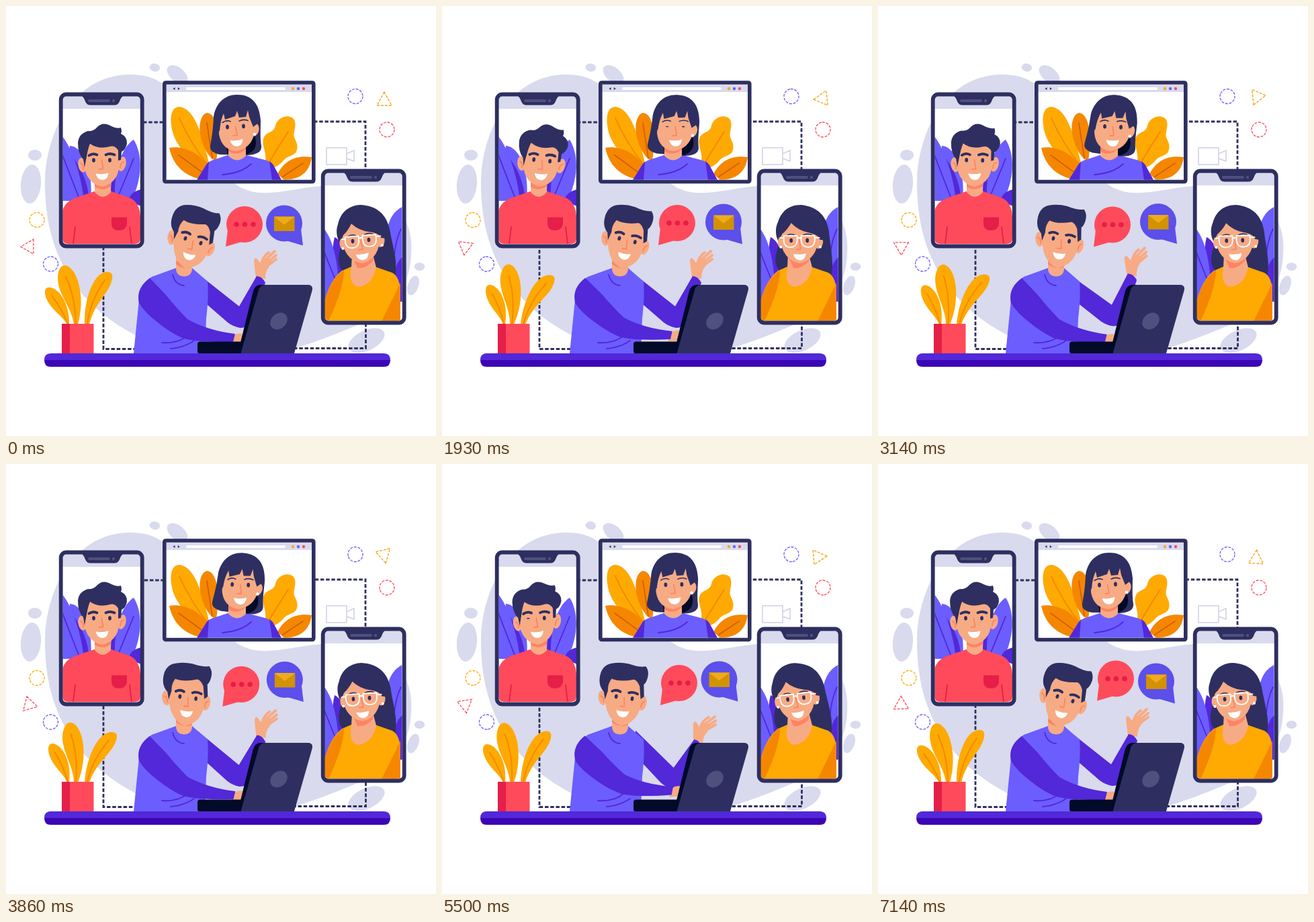
An HTML page for the animation above (7210 ms loop, 640 by 640 pixels).

```html
<!DOCTYPE html>
<html lang="en">
<head>
<meta charset="utf-8">
<title>Video call</title>
<style>
html, body { margin: 0; width: 100%; height: 100%; overflow: hidden; background: #fff; }
svg { display: block; width: 100vw; height: 100vh; }
.n { fill: #2e2f60 } .k { fill: #020a28 } .w { fill: #fff } .b { fill: #d9daed }
.p { fill: #6c5dff } .d { fill: #5228d9 } .r { fill: #ff4a5b } .m { fill: #e51f48 }
.o { fill: #ffa903 } .a { fill: #f58700 } .s { fill: #f7ab84 } .h { fill: #ff8364 }
.l { fill: none; stroke-width: 1.8; stroke-linecap: round; stroke-linejoin: round }
.ln { stroke: #2e2f60 } .ld { stroke: #5228d9 } .la { stroke: #f58700 }
.lm { stroke: #e51f48 } .lh { stroke: #ff8364 } .lw { stroke: #fff } .lc { stroke: #d35f08 }
.dash { fill: none; stroke-width: 1.3; stroke-dasharray: 4 1.8 }
</style>
</head>
<body>
<svg viewBox="0 0 640 640">
<defs>
  <clipPath id="screenL"><path d="M84.5 153H200V346Q200 354 192 354H92Q84.5 354 84.5 346Z"/></clipPath>
  <clipPath id="screenR"><path d="M474 267H589.5V460Q589.5 468.5 582 468.5H482Q474 468.5 474 460Z"/></clipPath>
  <clipPath id="screenM"><path d="M238 128H455V258.5H238Z"/></clipPath>
  <g id="phone">
    <rect class="w" x="81.5" y="131.5" width="121" height="226" rx="8"/>
    <path class="b" d="M84 153V140Q84 134 92 134H192Q200 134 200 140V153Z"/>
  </g>
  <g id="bezel">
    <rect class="ln" fill="none" x="81.7" y="131.5" width="121" height="226" rx="8" stroke-width="5.8"/>
    <path class="n" d="M112 133H175Q171 136 169 142Q167 147.500 161 147.500H126Q120 147.500 118 142Q116 136 112 133Z"/>
    <rect x="122" y="139" width="33" height="4" rx="2" fill="#50507f"/>
    <circle cx="160" cy="141" r="2.2" fill="#50507f"/>
  </g>
</defs>

<!-- backdrop -->
<g class="b">
  <path d="M185 102C100 102 58 190 58 265C58 390 125 458 205 496V517H400C440 509 488 490 520 476C590 450 606 400 603 350C600 310 570 262 470 268C430 271 395 283 365 276C335 268 320 245 300 220C260 150 250 102 185 102Z"/>
  <ellipse cx="221.5" cy="91.5" rx="7.8" ry="6" transform="rotate(10 221 91)"/>
  <ellipse cx="255" cy="102" rx="18" ry="10.5" transform="rotate(40 255 102)"/>
  <ellipse cx="43" cy="222" rx="10" ry="8"/>
  <ellipse cx="37" cy="265" rx="15" ry="29" transform="rotate(5 37 265)"/>
  <ellipse cx="615.5" cy="388" rx="7.8" ry="6"/>
  <ellipse cx="606" cy="416" rx="8" ry="15" transform="rotate(20 606 416)"/>
  <ellipse cx="536.5" cy="498" rx="29" ry="15" transform="rotate(-25 536 498)"/>
</g>
<g id="links" class="ln" fill="none" stroke-width="2.8" stroke-dasharray="5.5 2.7">
  <path d="M204 173H236"/><path d="M458 172H535V246"/>
  <path d="M145 358V510.5H194"/><path d="M535.5 472V509.5H428"/>
</g>
<g class="dash">
  <circle class="spin" cx="520" cy="134.5" r="11" stroke="#6c5dff"/>
  <circle class="spin" cx="567" cy="184" r="11" stroke="#ff4a5b"/>
  <circle class="spin" cx="46" cy="318.5" r="11" stroke="#ffa903"/>
  <circle class="spin" cx="66.5" cy="384" r="11" stroke="#6c5dff"/>
  <path id="triO" d="M563 128L574 148H552Z" stroke="#f5a20a"/>
  <path id="triR" d="M34.5 345.5L45.5 364.5H23.5Z" stroke="#ff4a5b"/>
</g>
<path fill="none" stroke="#d0d0e3" stroke-width="1.5" d="M477 211H507V236H477ZM507 220L518 215V231L507 227"/>

<!-- left phone -->
<use href="#phone"/>
<g clip-path="url(#screenL)">
  <path class="p" d="M95 208C116 210 130 245 126 290H108C94 265 90 235 95 208Z"/>
  <path class="d" d="M97 222C112 240 122 262 124 290H100Z"/>
  <path class="p" d="M84 194C98 212 112 250 116 290H84Z"/>
  <path class="d" d="M172 222C158 238 154 262 157 290H170Z"/>
  <path class="p" d="M190 199C170 212 160 250 162 290H186C203 260 204 220 190 199Z"/>
  <path class="l ld" d="M84 222L108 284M190 227L167 283"/>
  <path class="d" d="M201 273Q183 277 183 291L201 298Z"/>
  <path class="r" d="M84 355V306Q87 290 108 284L131 276H157L183 285Q199 291 200 314V355Z"/>
  <path class="m" d="M157 314.5H180V325Q178 334 168 334Q158 334 157 325Z"/>
  <path class="l lm" d="M103 329L100 354M184 329L187 354"/>
  <path class="s" d="M132 255H156V277Q144 291 132 277Z"/>
  <path class="h" d="M132 260H156V268Q144 277 132 269Z"/>
  <g id="headL">
    <ellipse class="s" cx="113.5" cy="237" rx="6" ry="11" transform="rotate(-10 113 237)"/>
    <ellipse class="s" cx="172.5" cy="235" rx="6" ry="11" transform="rotate(12 172 235)"/>
    <path class="l lh" d="M111 234Q116 236 115 243M175 232Q170 234 170 241"/>
    <path class="s" d="M117 200V241Q121 264 143 269Q165 264 168 241V200Z"/>
    <path class="n" d="M117 240L115 228Q107 220 107 204Q108 190 122 186Q130 187 135 181Q144 171 157 179Q165 183 171 181Q173 187 171 190Q181 195 180 205Q178 214 172 217L171 229L167 230V215Q162 207 155 209Q138 214 125 205Q122 212 120 224Z"/>
    <g id="faceL"></g>
  </g>
</g>
<use href="#bezel"/>

<!-- browser window -->
<rect class="w" x="236" y="114" width="222" height="147"/>
<path class="b" d="M238 117H455V128H238Z"/>
<rect class="w" x="268" y="121" width="148" height="4" rx="2"/>
<path class="n" d="M251.5 121V125L248.5 123ZM255.800 121V125L258.8 123Z"/>
<circle class="o" cx="427" cy="123" r="2.2"/><circle class="p" cx="435" cy="123" r="2.2"/><circle class="r" cx="443" cy="123" r="2.2"/>
<g clip-path="url(#screenM)">
  <path class="o" d="M303 238C280 238 255 212 248 188C242 164 247 150 258 150C280 152 292 190 303 238Z"/>
  <path class="a" d="M307 228C286 207 282 164 299 159C316 160 318 200 313 230Z"/>
  <path class="a" d="M243 211C268 207 292 222 302 240L292 258C265 254 248 236 243 211Z"/>
  <path class="l la" d="M258 167Q275 205 300 236"/>
  <path class="l lc" d="M299 174L307 226M257 222L294 249"/>
  <path class="o" d="M385 235C390 220 380 208 383 198C386 186 399 190 401 178C404 166 420 160 428 168C434 176 427 188 429 195C431 201 435 206 433 214C431 224 419 222 413 230C406 238 395 244 388 243Z"/>
  <path class="a" d="M455 225C430 221 413 232 404 250L414 259C440 258 452 246 455 225Z"/>
  <path class="l la" d="M420 187Q405 210 392 232"/>
  <path class="l lc" d="M442 234L412 254"/>
  <path class="p" d="M284 259L297 238Q300 231 312 228L330 222H358L385 229Q396 232 399 239L410 259Z"/>
  <path class="d" d="M284 259L297 238Q300 233 302 232L300 259ZM392 231Q397 234 399 239L410 259H396Z"/>
  <path class="l ld" d="M322 251Q350 249 365 235"/>
  <path id="hairM" class="n" d="M344 132C325 132 312 145 309 165C308 190 305 200 304 210Q304 218 318 221L360 222C375 221 381 216 380 208C378 195 379 185 379 170C377 145 366 132 344 132Z"/>
  <path id="innerM" class="k" d="M325 195H371Q376 215 358 221H330Z"/>
  <path class="s" d="M331 200H357V223Q344 236 331 223Z"/>
  <path class="h" d="M331 208H357V213Q344 225 331 216Z"/>
  <g id="headM">
    <ellipse class="s" cx="371" cy="184" rx="5.5" ry="9" transform="rotate(10 371 184)"/>
    <path class="s" d="M317 155V191Q321 214 343 216Q366 211 370 188V155Z"/>
    <path class="n" d="M315 186Q310 150 330 142H358Q376 150 373 176L368 180L362 165L360 155L357 165L347 166L344 156L341 164L326 169L324 160Q319 170 318 186Z"/>
    <circle class="w" cx="370" cy="191" r="2.3"/>
    <g id="faceM"></g>
  </g>
</g>
<rect class="ln" fill="none" x="235.8" y="114" width="222" height="147.5" rx="2" stroke-width="5.6"/>

<!-- right phone -->
<use href="#phone" x="390" y="114"/>
<g clip-path="url(#screenR)">
  <path class="d" d="M489 344C506 352 512 385 506 420H492C485 395 484 365 489 344Z"/>
  <path class="p" d="M473 331C486 347 496 380 496 440H473Z"/>
  <path class="p" d="M590 299C566 310 561 345 570 385L578 440H590Z"/>
  <path class="d" d="M590 374C577 384 574 410 580 440H590Z"/>
  <path class="l ld" d="M474 367L492 412M588 332Q578 352 577 385"/>
  <path id="hairR" class="n" d="M527 296C552 297 566 310 571 332C574 350 578 362 580 380Q581 397 578 408L502 396C492 386 494 372 499 356C491 345 491 333 494 325C498 305 512 297 527 296Z"/>
  <path class="o" d="M474 469V440Q482 408 500 394L514 388H549L575 397Q586 403 587 425V469Z"/>
  <path class="a" d="M474 469V440Q482 408 503 393Q503 420 480 469ZM587 412L559 469H587Z"/>
  <path class="s" d="M515 370H546L551 389Q546 415 524 418Q509 414 514 389Z"/>
  <path class="h" d="M516 374H546V380Q534 392 523 390Z"/>
  <g id="headR">
    <ellipse class="s" cx="501" cy="353" rx="4.5" ry="9"/>
    <ellipse class="s" cx="558" cy="350" rx="5.5" ry="9" transform="rotate(8 558 350)"/>
    <path class="s" d="M501 320V354Q507 379 530 383Q552 378 556 352V320Z"/>
    <path class="n" d="M499 348Q488 320 510 302Q548 290 564 316Q572 332 566 346L558 345Q556 338 540 336Q525 334 514 324Q508 336 502 341Z"/>
    <circle class="w" cx="501.5" cy="361" r="2"/><circle class="w" cx="560" cy="356" r="2"/>
    <g id="faceR"></g>
    <g class="l lw" transform="rotate(-5 528 349)">
      <path id="lens" d="M505 342H525V350Q524 359 515 359Q506 359 505 350Z"/>
      <use href="#lens" x="26"/>
      <path d="M525 346Q528 344 531 346M551 345L558 345M505 345H500"/>
    </g>
  </g>
</g>
<use href="#bezel" x="390" y="114"/>

<!-- plant -->
<g class="o">
  <g id="leaf1"><path d="M91 474C84 460 62 450 58 428Q57 417 67 419C82 423 95 447 94 474Z"/><path class="l la" d="M68 431Q82 449 92 473"/></g>
  <g id="leaf2"><path d="M101 474C98 448 77 430 77 404Q78 386 88 386C106 389 119 432 107 474Z"/><path class="l la" d="M89 403Q103 432 104 473"/></g>
  <g id="leaf3"><path d="M117 474C116 440 128 400 148 396Q160 394 158 406C154 428 132 440 124 474Z"/><path class="l la" d="M147 408Q125 440 121 473"/></g>
</g>
<path class="r" d="M83 473H130.5V517H83Z"/><path class="m" d="M83 473H95V517H83Z"/>

<!-- man at the desk -->
<g id="wave">
  <g class="s">
    <path d="M372 404Q370 391 369 379Q371 372 375 378L378 382L386 376Q393 374 395 381L391 389Q386 395 386 406Z"/>
    <path class="l" style="stroke:#f7ab84;stroke-width:4" d="M380 384Q383 372 391 367M384 380L400 365M386 384L402 371M387 388L402 377"/>
  </g>
  <path class="d" d="M285 398L347 447L373 402Q381 402 386 412L370 455Q364 480 348 479Q338 477 330 471L285 432Z"/>
</g>
<path class="p" d="M190 517L198 437Q200 414 217 403L253 390H277L300 410Q302 432 298 465L296 517Z"/>
<path class="l ld" d="M248 400Q252 415 265 416M232 501Q256 503 271 490M245 510Q266 508 280 498"/>
<g id="typing">
  <path class="s" d="M334 503L339 490Q347 485 355 489L356 503Z"/>
  <path class="d" d="M214 405Q193 420 198 442Q206 456 227 472Q247 488 265 495Q290 501 338 500L341 488Q300 483 270 466Q254 450 238 430Z"/>
</g>
<path class="s" d="M253 372H277V390Q277 402 265 402.5Q253 402 253 390Z"/>
<path class="h" d="M253 380H277V388Q265 394 253 384Z"/>
<g id="headD">
  <ellipse class="s" cx="237" cy="349" rx="6" ry="11" transform="rotate(-10 237 349)"/>
  <ellipse class="s" cx="297" cy="355" rx="6" ry="11" transform="rotate(12 297 355)"/>
  <path class="l lh" d="M234 346Q240 348 239 355M300 352Q295 354 295 361"/>
  <path class="s" d="M242 318V357Q246 382 266 390Q290 384 294 360V318Z"/>
  <path class="n" d="M241 351L239 340Q231 332 232 320Q233 303 246 298Q260 294 275 297Q290 302 300 300Q306 307 303 318Q301 325 298 327L299 345L294 349L292 330Q288 321 283 320Q262 325 250 320Q244 328 245 338Z"/>
  <g id="faceD"></g>
</g>
<rect class="k" x="285" y="499.5" width="72" height="18" rx="4"/>
<path class="k" d="M345 517L368 424Q371 415 379 415H390L360 517Z"/>
<path class="n" d="M349.5 517L376 423Q378 415 386 415H449Q458 415 455.5 424L429 517Z"/>
<ellipse cx="406" cy="469" rx="14" ry="11" fill="#50507f" transform="rotate(-42 406 469)"/>
<path class="d" d="M66.5 517H562.5Q572 517 572 527H57Q57 517 66.5 517Z"/>
<path fill="#3c05b5" d="M57 527H572Q572 537 562.5 537H66.5Q57 537 57 527Z"/>

<!-- speech bubbles -->
<g id="chat">
  <circle class="r" r="27"/><path class="r" d="M-25 8L-28 33L-4 26Z"/>
  <g class="m"><circle cx="-12" r="3.8"/><circle cx=".5" r="3.8"/><circle cx="13" r="3.8"/></g>
</g>
<g id="mail" fill="#5c4fea">
  <circle r="27"/><path d="M25 8L28 33L4 26Z"/>
  <path fill="#d39200" d="M-15 -10H15.5V11.5H-15Z"/><path fill="#efab1c" d="M-15 -10H15.5L0 2Z"/>
</g>
</svg>
<script>
const LOOP = 7.21;
const KEYS = [0, 1.07, 1.93, 3.14, 4.57, 5.5, 7.14];
const SPAN = 7.14;
const $ = id => document.getElementById(id);

// Facial features around the point between the eyes
function face(id, x, y, tilt, thick) {
  $(id).innerHTML = `<g transform="translate(${x} ${y}) rotate(${tilt})">
    <path class="l ln" style="stroke-width:${thick}" d="M-19 -7Q-13 -11 -7 -8M6 -8Q12 -11 19 -8"/>
    <ellipse class="n" cx="-12" rx="2.4" ry="3.3"/><ellipse class="n" cx="12" rx="2.4" ry="3.3"/>
    <path class="l lh" d="M0 0L2 13L-4 13.5"/>
    <path class="w" d="M-9 20Q1 22 10 19Q9 29 1 29.5Q-7 29 -9 20Z"/></g>`;
  return $(id).querySelectorAll('ellipse');
}
const eyesL = face('faceL', 142.5, 229.5, 0, 3.8);
const eyesM = face('faceM', 341.5, 179.5, -3, 1.6);
face('faceR', 528, 349, -5, 1.6);
face('faceD', 269.5, 347.5, 6, 3.8);

// Smooth cyclic curve through one value per key time
function curve(t, v) {
  const n = KEYS.length - 1, u = Math.min(t, SPAN);
  let i = 0;
  while (i < n - 1 && u >= KEYS[i + 1]) i++;
  const slope = j => {
    const k = (j + n) % n, d = KEYS[k + 1] - KEYS[k];
    return [(v[k + 1] - v[k]) / d, d];
  };
  const tangent = j => {
    const [a, da] = slope(j - 1), [b, db] = slope(j);
    return a * b <= 0 ? 0 : (a * db + b * da) / (da + db);
  };
  const d = KEYS[i + 1] - KEYS[i], s = (u - KEYS[i]) / d, q = 1 - s;
  return v[i] * (1 + 2 * s) * q * q + tangent(i) * d * s * q * q
       + v[i + 1] * s * s * (3 - 2 * s) - tangent(i + 1) * d * s * s * q;
}

const set = (id, value) => $(id).setAttribute('transform', value);
const turn = (id, deg, x, y) => set(id, `rotate(${deg.toFixed(3)} ${x} ${y})`);
const lid = (eye, t, at) => eye.setAttribute('ry', 3.3 * Math.max(0.25, Math.min(1, Math.abs(t - at) / 0.14)));
const spinners = document.querySelectorAll('.spin');

function draw(t) {
  const c = (...v) => curve(t, v);

  turn('headL', c(0, 3, 5.6, 1.3, -0.8, -1.8, 0), 143, 283);
  set('faceL', `translate(${c(0, 0.6, 1, 0, 0, -0.5, 0)} 0)`);
  const tiltM = c(0, 1.8, 3.5, 5.7, 4, 1.8, 0);
  for (const id of ['hairM', 'innerM', 'headM']) turn(id, tiltM, 344, 240);
  set('faceM', `translate(${c(0, 1.5, 2, 2, 1.5, 1.5, 0)} 0)`);
  const tiltR = c(0, 3.4, 4.6, 3.4, -0.9, -1.8, 0);
  turn('hairR', tiltR, 530, 395);
  turn('headR', tiltR, 530, 395);
  turn('headD', c(11, 11.3, 7.4, 4, 0, 2, 11), 264, 395);

  lid(eyesM[0], t, 1.93);
  lid(eyesM[1], t, 1.93);
  lid(eyesL[0], t, 5.5);
  lid(eyesL[1], t, 5.65);

  // Both arms swing from the shoulder
  turn('wave', c(0, 3.6, 0, -2.7, 5.8, 6, 0), 298, 428);
  turn('typing', c(0, -1.7, -1.7, 0.3, -1.6, -3.2, 0), 205, 430);
  set('chat', `translate(${c(355, 352, 350, 349, 352, 353, 354)} ${c(325, 324, 323, 325.5, 329.5, 326, 319.5)})`);
  set('mail', `translate(${c(414, 413, 419, 417, 413, 412.5, 414)} ${c(323.5, 322.5, 321.5, 321, 321, 320.5, 323.5)})`);

  const sway = c(0, 4.8, 8.2, 6.8, 4.9, 3.6, 0);
  turn('leaf1', sway, 93, 474);
  turn('leaf2', sway, 104, 474);
  turn('leaf3', sway * 0.95, 121, 474);

  turn('triO', -360 * t / LOOP, 563, 138);
  turn('triR', 30 - 105.2 * t, 34.5, 358.2);
  for (const s of spinners)
    s.setAttribute('transform', `rotate(${-360 * t / LOOP} ${s.getAttribute('cx')} ${s.getAttribute('cy')})`);
  $('links').setAttribute('stroke-dashoffset', -8.2 * 6 * t / LOOP);
}

function tick() {
  draw(performance.now() / 1000 % LOOP);
  requestAnimationFrame(tick);
}
tick();
</script>
</body>
</html>
```
